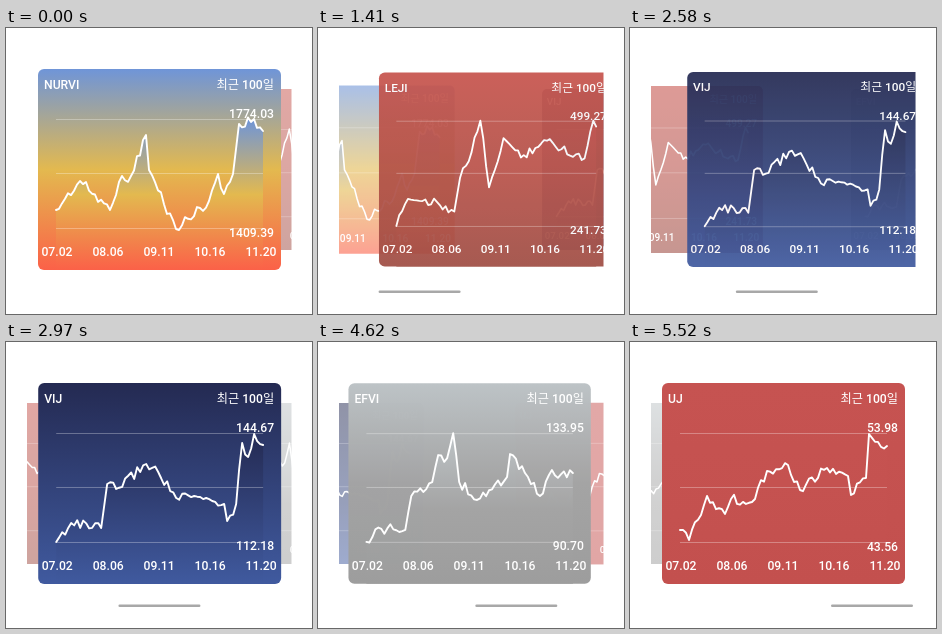
Animation, 306 px wide and 286 px high, one loop 6150 ms. Source, as an HTML page:

```html
<!DOCTYPE html>
<html lang="ko">
<head>
<meta charset="utf-8">
<style>
  html, body { margin: 0; width: 100%; height: 100%; overflow: hidden; background: #fff; }
  svg { display: block; }
  text { font: 500 12.2px Roboto, "Noto Sans CJK KR", "Noto Sans CJK", sans-serif; fill: #fff; }
  .grid { stroke: #fff; stroke-opacity: .3; }
  .line { fill: none; stroke: #fff; stroke-width: 1.9; stroke-linejoin: round; stroke-linecap: round; }
</style>
</head>
<body>
<svg id="stage" width="306" height="286" viewBox="0 0 306 286">
  <defs id="defs"><clipPath id="view"><rect x="21" y="0" width="264.5" height="286"/></clipPath></defs>
  <g clip-path="url(#view)"><g id="deck"></g></g>
  <rect id="bar" y="262.5" width="82" height="2.5" rx="1.25" fill="#a8a8a8"/>
</svg>
<script>
const LOOP = 6150, CX = 153.5, CY = 141.5, GAP = 143;
const DATES = ['07.02', '08.06', '09.11', '10.16', '11.20'];

// trend: turning points as "step,y"; the steps between them get seeded jitter
const stocks = [
  { name: 'NURVI', high: '1774.03', low: '1409.39', colors: ['#6f95d8', '#e3b94f', '#fb6148'],
    trend: '0,182 8,153 18,182 21,154 25,148 30,107 31,142 40,201 51,173 54,146 56,166 59,146 61,96 66,91 69,103' },
  { name: 'LEJI', high: '499.27', low: '241.73', colors: ['#c6524b', '#9e4b41'],
    trend: '0,200 4,172 14,175 20,185 22,150 25,133 29,91 32,160 34,142 37,109 43,129 51,111 65,130 68,91 69,97' },
  { name: 'VIJ', high: '144.67', low: '112.18', colors: ['#242a52', '#405a9f'],
    trend: '0,200 5,181 15,186 17,142 20,147 30,122 34,130 40,156 50,156 56,162 57,179 60,162 62,101 64,115 66,92 69,103' },
  { name: 'EFVI', high: '133.95', low: '90.70', colors: ['#bdc3c6', '#a4a4a4', '#9d9d9d'],
    trend: '0,200 5,187 13,188 15,154 22,140 24,113 27,116 29,91 31,140 37,158 47,135 48,112 58,154 61,133 69,131' },
  { name: 'UJ', high: '53.98', low: '43.56', colors: ['#c65351', '#c3504e'],
    trend: '0,188 3,198 9,154 15,172 17,157 24,160 29,129 36,123 40,148 49,126 56,134 57,153 62,136 63,92 69,104' }
];

// [start, duration] of each swipe to the next card
const swipes = [[930, 940], [1970, 1150], [3325, 710], [4597, 640]];

const $ = id => document.getElementById(id);

function make(tag, attrs, parent, text = '') {
  const el = document.createElementNS('http://www.w3.org/2000/svg', tag);
  for (const key in attrs) el.setAttribute(key, attrs[key]);
  el.textContent = text;
  return parent.appendChild(el);
}

function gradient(id, colors, y1, y2) {
  const g = make('linearGradient', { id, gradientUnits: 'userSpaceOnUse', x1: 0, x2: 0, y1, y2 }, $('defs'));
  colors.forEach((c, i) => make('stop', { offset: i / (colors.length - 1), 'stop-color': c }, g));
  return `url(#${id})`;
}

function jitter(step, seed) {
  const v = Math.sin(step * 12.9898 + seed * 78.233) * 43758.5453;
  return (v - Math.floor(v) - .5) * 10;
}

function chartPoints(trend, seed) {
  const keys = trend.split(' ').map(p => p.split(',').map(Number));
  const points = [];
  keys.forEach(([k, y], i) => {
    const [end, endY] = keys[i + 1] || [k + 1, y];
    for (let s = k; s < end; s++) {
      const base = y + (endY - y) * (s - k) / (end - k);
      points.push(`${50 + 3 * s},${s === k ? y : base + jitter(s, seed)}`);
    }
  });
  return points.join(' ');
}

function buildCard({ name, high, low, colors, trend }, i) {
  const g = make('g', {}, $('deck'));
  const label = (text, x, y, anchor = 'start') => make('text', { x, y, 'text-anchor': anchor }, g, text);
  const points = chartPoints(trend, i + 1);
  make('rect', { x: 32, y: 41, width: 243, height: 201, rx: 6, fill: gradient('card' + i, colors, 41, 242) }, g);
  make('polygon', { points: `50,242 ${points} 257,242`, fill: gradient('area' + i, colors, 91, 242) }, g);
  for (const y of [91.5, 145.5, 200.5]) make('path', { class: 'grid', d: `M50 ${y}H257` }, g);
  make('polyline', { class: 'line', points }, g);
  label(name, 38, 61);
  label('최근 100일', 268, 61, 'end');
  label(high, 268, 90, 'end');
  label(low, 268, 208.5, 'end');
  DATES.forEach((d, k) => label(d, 51 + 51 * k, 228, 'middle'));
  return g;
}

const cards = stocks.map(buildCard);

function ease(u) {
  u = Math.min(1, Math.max(0, u));
  return 1 - (1 - u) ** 4 * (1 + 4 * u);
}

function draw(now) {
  const t = now % LOOP;
  const page = swipes.reduce((sum, [start, length]) => sum + ease((t - start) / length), 0);
  const dist = i => Math.abs(i - page);
  // The card nearest the centre is drawn last
  cards.map((_, i) => i).sort((a, b) => dist(b) - dist(a)).forEach(i => {
    const near = Math.min(1, dist(i));
    const x = CX + (i - page) * GAP;
    cards[i].setAttribute('transform', `translate(${x} ${CY}) scale(${1 - .2 * near}) translate(${-CX} ${-CY})`);
    cards[i].setAttribute('opacity', 1 - .5 * near);
    $('deck').append(cards[i]);
  });
  $('bar').setAttribute('x', 24 + 44.25 * page);
  $('bar').setAttribute('opacity', t < swipes[0][0] ? 0 : 1);
  requestAnimationFrame(draw);
}
requestAnimationFrame(draw);
</script>
</body>
</html>
```
